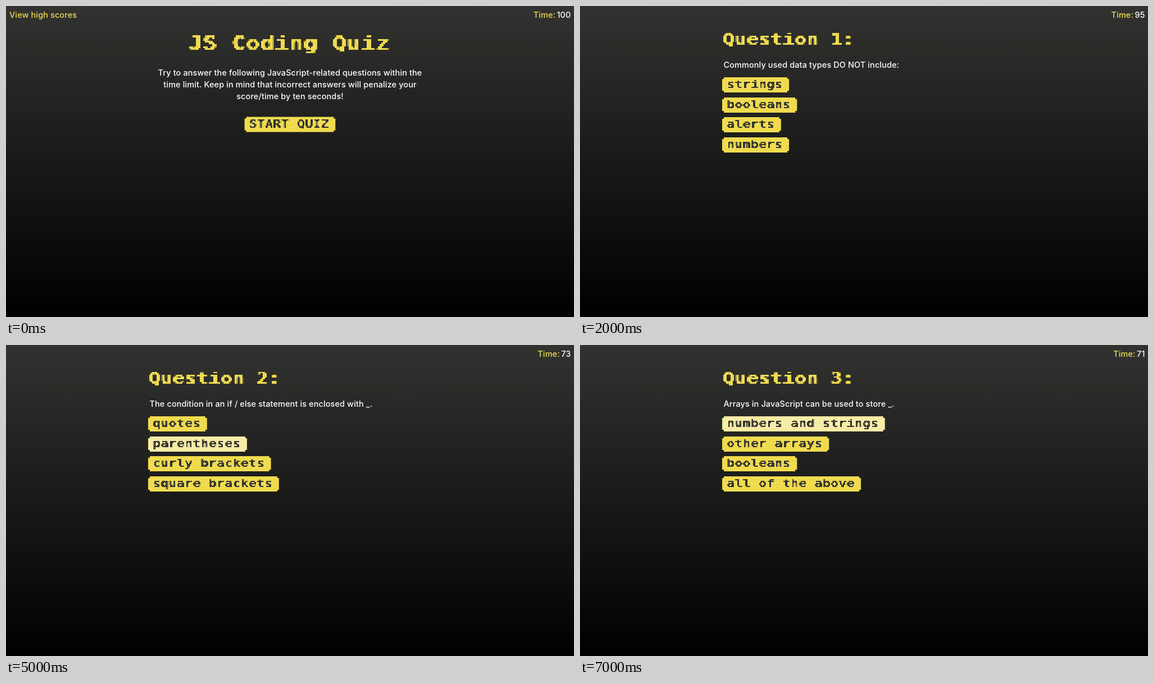
An HTML page with a canvas that plays this animation: 1011x554 px, repeating every 8 s.

```html
<!DOCTYPE html>
<html lang="en">
<head>
<meta charset="utf-8">
<title>JS Coding Quiz</title>
<style>
  html, body { margin: 0; width: 100%; height: 100%; overflow: hidden; background: #000; }
  canvas { display: block; }
</style>
</head>
<body>
<canvas id="stage" width="1011" height="554"></canvas>
<script>
const ctx = document.getElementById('stage').getContext('2d');
const YELLOW = '#f0db4f', PALE = '#f8eca6', DARK = '#323330', WHITE = '#fff';
const LOOP = 8000, STEP = 1000;
const CELL = 8, ROWS = 10, BASE = 8, WIDE = 1.38; // pixel lettering grid

const questions = [
  ['Commonly used data types DO NOT include:',
    'strings', 'booleans', 'alerts', 'numbers'],
  ['The condition in an if / else statement is enclosed with _.',
    'quotes', 'parentheses', 'curly brackets', 'square brackets'],
  ['Arrays in JavaScript can be used to store _.',
    'numbers and strings', 'other arrays', 'booleans', 'all of the above']
];

// One scene per second; hover is the index of the highlighted answer.
const scenes = [
  { time: 100 },
  { time: 100, hover: 0 },
  { time: 95, question: 1 },
  { time: 94, question: 1, hover: 2 },
  { time: 100, question: 2, correct: true },
  { time: 73, question: 2, hover: 1 },
  { time: 72, question: 3, correct: true },
  { time: 71, question: 3, hover: 0 }
];

function write(text, x, y, color = WHITE, align = 'left', style = '') {
  ctx.font = `${style} 500 14.4px Inter, "Open Sans", sans-serif`;
  ctx.letterSpacing = '0.15px';
  ctx.textAlign = align;
  ctx.fillStyle = color;
  ctx.fillText(text, x, y);
}

// Sets text on a coarse grid and sharpens its coverage into blocky letters.
const letterCache = new Map();
function blockLetters(text, color) {
  const key = color + text;
  if (letterCache.has(key)) return letterCache.get(key);
  const tile = document.createElement('canvas');
  tile.width = text.length * CELL;
  tile.height = ROWS;
  const pen = tile.getContext('2d');
  pen.font = 'bold 9.6px "DejaVu Sans Mono", monospace';
  pen.textAlign = 'center';
  pen.fillStyle = color;
  pen.scale(WIDE, 1);
  [...text].forEach((ch, i) => pen.fillText(ch, (i * CELL + 3.5) / WIDE, BASE));
  const image = pen.getImageData(0, 0, tile.width, ROWS);
  for (let i = 3; i < image.data.length; i += 4) {
    image.data[i] = (image.data[i] - 128) * 5 + 128;
  }
  pen.putImageData(image, 0, 0);
  letterCache.set(key, tile);
  return tile;
}

function writeBlocky(text, x, baseline, size, color) {
  const tile = blockLetters(text, color), unit = size / 9;
  ctx.imageSmoothingEnabled = false;
  ctx.drawImage(tile, x, baseline - BASE * unit, tile.width * unit, ROWS * unit);
}

// Headings are emboldened by overprinting with a one pixel shift.
function heading(text, x, baseline, size) {
  writeBlocky(text, x - 0.5, baseline, size, YELLOW);
  writeBlocky(text, x + 0.5, baseline, size, YELLOW);
}

function button(text, x, y, hovered) {
  const width = text.length * CELL * 16 / 9 + 19.5, height = 27;
  ctx.fillStyle = hovered ? PALE : YELLOW;
  ctx.fillRect(x + 3, y, width - 6, height);
  ctx.fillRect(x, y + 3, width, height - 6);
  writeBlocky(text, x + 9, y + 19, 16, DARK);
}

function drawIntro(hover) {
  write('View high scores', 6, 21, YELLOW);
  heading('JS Coding Quiz', 326, 78, 28.8);
  [
    'Try to answer the following JavaScript-related questions within the',
    'time limit. Keep in mind that incorrect answers will penalize your',
    'score/time by ten seconds!'
  ].forEach((line, i) => write(line, 505.5, 123.5 + i * 21.4, WHITE, 'center'));
  button('START QUIZ', 424.6, 197.5, hover === 0);
}

function drawQuestion({ question, hover, correct }) {
  const [prompt, ...answers] = questions[question - 1];
  heading(`Question ${question}:`, 255, 69, 24);
  write(prompt, 255.5, 110);
  answers.forEach((answer, i) =>
    button(answer, 253, Math.round(127 + i * 35.56), hover === i));
  if (correct) write('Correct!', 255.5, 288, PALE, 'left', 'italic');
}

function drawScene(scene) {
  const shade = ctx.createLinearGradient(0, 0, 0, 554);
  shade.addColorStop(0, DARK);
  shade.addColorStop(1, '#000');
  ctx.fillStyle = shade;
  ctx.fillRect(0, 0, 1011, 554);

  write(scene.time, 1005.5, 21, WHITE, 'right');
  const numberWidth = ctx.measureText(scene.time).width;
  write('Time:', 1005.5 - numberWidth - 2.5, 21, YELLOW, 'right');

  if (scene.question) drawQuestion(scene);
  else drawIntro(scene.hover);
}

const start = performance.now();
let shown = -1;
function tick() {
  const index = Math.floor((performance.now() - start) % LOOP / STEP);
  if (index !== shown) drawScene(scenes[shown = index]);
  requestAnimationFrame(tick);
}
tick();
</script>
</body>
</html>
```
